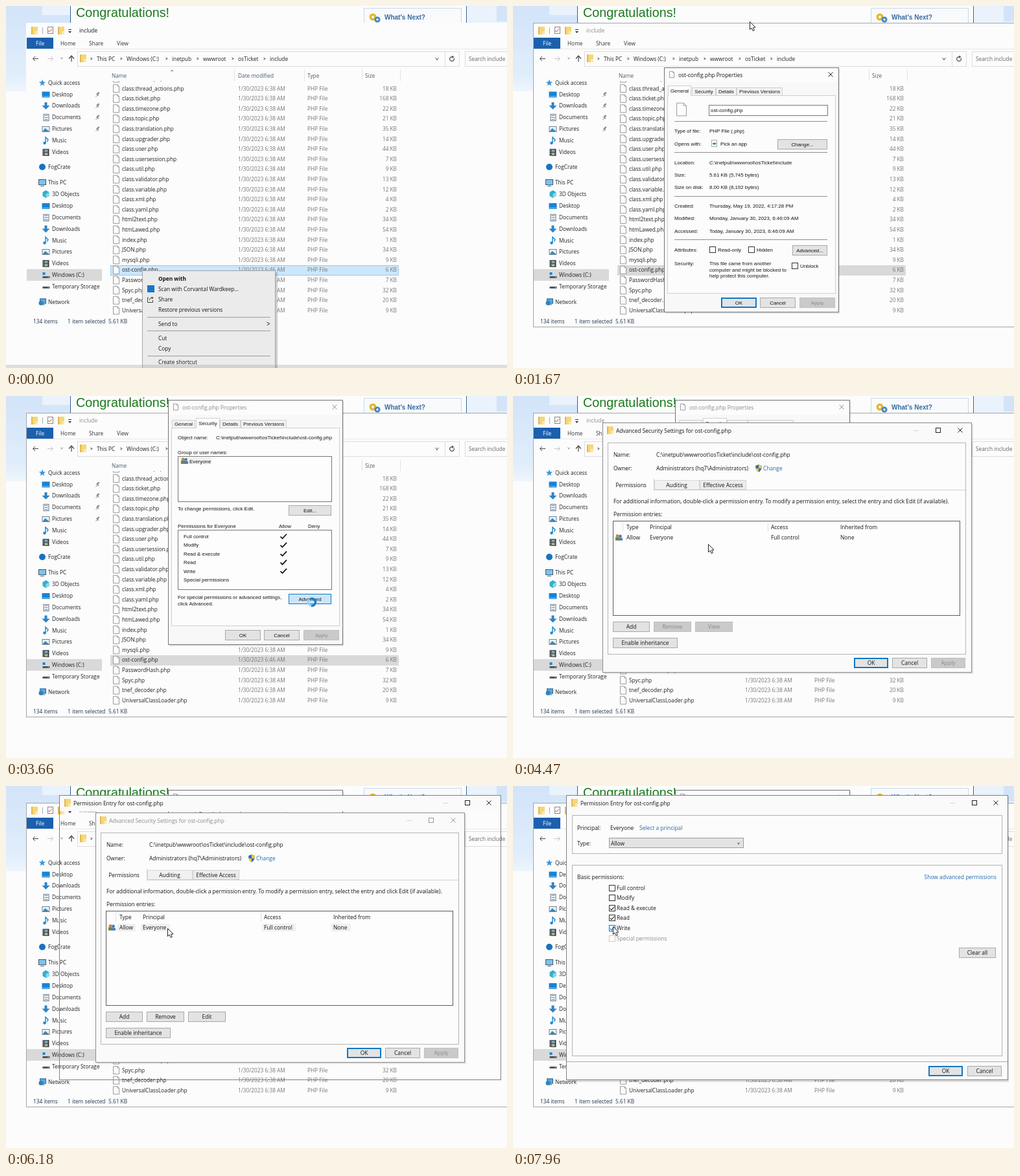
Animation, 773 px wide and 560 px high, one loop 8 s. Source, as an HTML page with a canvas:

```html
<!DOCTYPE html>
<html lang="en">
<head>
<meta charset="utf-8">
<title>File permissions</title>
<style>
html, body { margin: 0; width: 100%; height: 100%; overflow: hidden; background: #fcfcfc; }
canvas { display: block; }
</style>
</head>
<body>
<canvas id="stage" width="773" height="560"></canvas>
<script>
const c = document.getElementById('stage').getContext('2d');
const LOOP = 8000;
const UI = '"Open Sans", "Noto Sans", sans-serif';
const DLG = '"Liberation Sans", Arial, sans-serif';
const INK = '#161616', GREY = '#8b8b8b', PAPER = '#fcfcfc', LINK = '#2468ad', BLUE = '#0f78c8';
const FILE = 'ost-config.php';

// Drawing helpers
function box(x, y, w, h, fill, stroke) {
  if (fill) { c.fillStyle = fill; c.fillRect(x, y, w, h); }
  if (stroke) { c.strokeStyle = stroke; c.lineWidth = 1; c.strokeRect(x + .5, y + .5, w - 1, h - 1); }
}
function line(points, color = '#333', width = 1) {
  c.beginPath();
  points.forEach(([x, y], i) => i ? c.lineTo(x, y) : c.moveTo(x, y));
  c.strokeStyle = color; c.lineWidth = width; c.stroke();
}
function shape(points, fill, stroke) {
  c.beginPath();
  points.forEach(([x, y]) => c.lineTo(x, y));
  c.closePath();
  if (fill) { c.fillStyle = fill; c.fill(); }
  if (stroke) { c.strokeStyle = stroke; c.lineWidth = 1; c.stroke(); }
}
function disc(x, y, r, fill) {
  c.beginPath(); c.arc(x, y, r, 0, 7); c.fillStyle = fill; c.fill();
}
const hline = (x1, x2, y, color) => line([[x1, y + .5], [x2, y + .5]], color);
const vline = (x, y1, y2, color) => line([[x + .5, y1], [x + .5, y2]], color);

// y is the middle of the capitals
function text(s, x, y, color = INK, font = '8.3px ' + UI, align = 'left') {
  c.font = font; c.fillStyle = color; c.textAlign = align;
  c.fillText(s, x, Math.round(y + 3));
}
const ui = (s, x, y, color, align) => text(s, x, y, color, '8.45px ' + UI, align);
const dlg = (s, x, y, color, align) => text(s, x, y, color, '7.9px ' + DLG, align);

function clipTo(x, y, w, h, draw) {
  c.save(); c.beginPath(); c.rect(x, y, w, h); c.clip();
  draw(); c.restore();
}
function button(label, x, y, w, { write = ui, off, main, hot } = {}) {
  box(x, y, w, 16, off ? '#cacaca' : hot ? '#cce4f7' : '#e3e3e3', off ? '#c0c0c0' : main || hot ? BLUE : '#a9a9a9');
  if (main) box(x + 1, y + 1, w - 2, 14, null, BLUE);
  write(label, x + w / 2, y + 8, off ? GREY : INK, 'center');
}
function chevron(x, y, dx, dy, color = '#555') {
  line([[x - dx - dy, y - dy - dx], [x + dx * .8, y + dy * .8], [x - dx + dy, y - dy + dx]], color);
}
function cross(x, y, color) {
  line([[x - 3.5, y - 3.5], [x + 3.5, y + 3.5]], color);
  line([[x + 3.5, y - 3.5], [x - 3.5, y + 3.5]], color);
}
const tick = (x, y, s = 1, color = '#111', w = 1.7) =>
  line([[x - 4.5 * s, y], [x - 1.5 * s, y + 3 * s], [x + 5 * s, y - 4 * s]], color, w);
function checkbox(x, y, on, color = '#333') {
  box(x - 5, y - 5, 10, 10, '#fff', color);
  if (on) tick(x, y + .5, .7, color, 1.2);
}

// Icons
function folder(x, y) {
  box(x - 5, y - 6, 10, 12, '#f5d778');
  box(x - 5, y - 6, 2, 12, '#e3b84c');
  box(x + 1, y + 1, 4, 5, '#fae9ab');
}
function page(x, y, s = 1) {
  const p = (a, b) => [x + a * s, y + b * s];
  shape([p(-4.5, -6), p(2, -6), p(4.5, -3.5), p(4.5, 6), p(-4.5, 6)], '#fdfdfd', '#9a9a9a');
  line([p(2, -6), p(2, -3.5), p(4.5, -3.5)], '#9a9a9a');
}
function people(x, y) {
  disc(x - 2, y - 2, 2.4, '#b58c50'); box(x - 5, y, 6, 5, '#668754');
  disc(x + 2.5, y - 1.5, 2.4, '#557aa0'); box(x, y + 1, 6, 4, '#4f7dad');
}
function shield(x, y) {
  clipTo(x - 5, y - 6, 10, 12, () => {
    c.beginPath(); c.moveTo(x - 5, y - 4); c.lineTo(x, y - 6); c.lineTo(x + 5, y - 4);
    c.quadraticCurveTo(x + 5, y + 3, x, y + 6); c.quadraticCurveTo(x - 5, y + 3, x - 5, y - 4); c.clip();
    box(x - 5, y - 6, 10, 12, '#2d70b8');
    box(x, y - 6, 5, 6, '#f0c53c'); box(x - 5, y, 5, 6, '#f0c53c');
  });
}
const icons = {
  star(x, y) {
    shape(Array.from({ length: 10 }, (_, i) => {
      const r = i % 2 ? 2.3 : 5.5, a = i * Math.PI / 5 - Math.PI / 2;
      return [x + r * Math.cos(a), y + r * Math.sin(a)];
    }), '#3a94d8');
  },
  desktop(x, y) { box(x - 6, y - 4, 12, 9, '#1584d8'); box(x - 6, y + 3, 12, 1, '#8cc8f2'); },
  down(x, y) {
    shape([[x - 2, y - 5], [x + 2, y - 5], [x + 2, y], [x + 6, y], [x, y + 6], [x - 6, y], [x - 2, y]], '#2f83c6');
  },
  doc(x, y) {
    box(x - 4, y - 5, 9, 11, '#f7fafc', '#68798a');
    for (let i = 0; i < 3; i++) hline(x - 2, x + 3, y - 3 + i * 3, '#3d8bc9');
  },
  picture(x, y) {
    box(x - 6, y - 4, 12, 9, '#e3f2fb', '#78848d');
    shape([[x - 5, y + 4], [x - 1, y - 1], [x + 5, y + 4]], '#3a86b8');
  },
  note(x, y) {
    disc(x - 2, y + 4, 2.2, '#1b8bd5');
    line([[x - .5, y + 4], [x - .5, y - 5], [x + 3.5, y - 1], [x + 2, y + 2]], '#1b8bd5', 1.5);
  },
  film(x, y) {
    box(x - 5, y - 5, 10, 11, '#3c4045'); box(x - 2, y - 4, 5, 4, '#79a5c7'); box(x - 2, y + 1, 5, 4, '#a6b18b');
    for (let i = 0; i < 4; i++) box(x - 4, y - 4 + i * 3, 1, 1, '#eee');
  },
  dot(x, y) { disc(x, y, 5, '#1474c4'); },
  pc(x, y) { box(x - 6, y - 5, 12, 9, '#7cc3ec', '#43596b'); box(x - 3, y + 5, 6, 1, '#51646f'); },
  cube(x, y) {
    shape([[x - 5, y - 3], [x, y - 6], [x + 5, y - 3], [x + 5, y + 3], [x, y + 6], [x - 5, y + 3]], '#31b0cd');
    shape([[x, y], [x + 5, y - 3], [x + 5, y + 3], [x, y + 6]], '#87d8e5');
  },
  system(x, y) { box(x - 5, y - 4, 4, 4, '#1c86d0'); icons.drive(x, y + 2); },
  drive(x, y) { box(x - 5, y, 11, 3, '#50565b'); box(x + 3, y + 1, 2, 1, '#8fe08a'); },
  net(x, y) {
    box(x - 4, y - 5, 10, 8, '#5aa9dc', '#376c92'); disc(x - 2, y + 2, 3.5, '#2c83c4'); box(x, y + 4, 4, 1, '#48677b');
  }
};

// Desktop and web page behind
function desktop() {
  box(0, 0, 773, 560, PAPER);
  const sky = c.createLinearGradient(0, 0, 0, 140);
  sky.addColorStop(0, '#d3e4f9'); sky.addColorStop(.75, '#e0edfb'); sky.addColorStop(1, '#f3f8fd');
  box(0, 0, 100, 132, sky);
  box(56, 0, 43, 14, '#eaf3fc');
  box(712, 0, 61, 30, '#eaf2fc'); box(757, 0, 16, 24, '#d3e4f9');
  box(100, 0, 611, 30, PAPER);
  vline(99, 0, 27, '#2f5f98'); vline(710, 0, 27, '#2f5f98');
  text('Congratulations!', 108, 14, '#1b7a1e', '19.8px ' + DLG);
  box(552, 3, 151, 26, '#f8fafc', '#c9d8e8');
  disc(566, 17, 5.5, '#e5b72e'); disc(566, 17, 2, '#f8fafc');
  disc(573, 21, 4.5, '#4385c2'); disc(573, 21, 1.7, '#f8fafc');
  text("What's Next?", 584, 17.5, '#396a9d', 'bold 10px ' + DLG);
}

// File manager
const files = [['class.thread', 14], ['class.thread_actions', 18], ['class.ticket', 168], ['class.timezone', 22],
  ['class.topic', 21], ['class.translation', 35], ['class.upgrader', 14], ['class.user', 44], ['class.usersession', 7],
  ['class.util', 9], ['class.validator', 13], ['class.variable', 12], ['class.xml', 4], ['class.yaml', 2],
  ['html2text', 34], ['htmLawed', 54], ['index', 1], ['JSON', 34], ['mysqli', 9], ['ost-config', 6],
  ['PasswordHash', 7], ['Spyc', 32], ['tnef_decoder', 20], ['UniversalClassLoader', 9]];
const tree = [['Quick access', 119, 'star'], ['Desktop', 136.5, 'desktop', 1], ['Downloads', 154, 'down', 1],
  ['Documents', 172, 'doc', 1], ['Pictures', 190, 'picture', 1], ['Music', 208, 'note', 1], ['Videos', 226, 'film', 1],
  ['FogCrate', 249, 'dot'], ['This PC', 273, 'pc'], ['3D Objects', 291, 'cube', 1], ['Desktop', 309, 'desktop', 1],
  ['Documents', 327, 'doc', 1], ['Downloads', 344.5, 'down', 1], ['Music', 362.5, 'note', 1],
  ['Pictures', 380, 'picture', 1], ['Videos', 398, 'film', 1], ['Windows (C:)', 416, 'system', 1],
  ['Temporary Storage', 434, 'drive', 1], ['Network', 457.5, 'net']];

function explorer(active) {
  box(31, 26, 760, 471, PAPER, active ? null : '#a5a5a5');
  folder(44, 38); folder(85, 38);
  vline(56, 33, 43, '#aaa');
  box(64, 32, 9, 11, '#fff', '#888'); tick(68, 38, .6, '#c03b35', 1);
  hline(96, 101, 36, '#333'); shape([[96, 39], [101, 39], [98.5, 42]], '#333');
  text('include', 113, 38, active ? INK : GREY);
  box(32, 49, 41, 17, '#1b60ae');
  text('File', 52.5, 58, '#fff', undefined, 'center');
  [['Home', 84], ['Share', 128], ['View', 171]].forEach(([s, x]) => text(s, x, 58, '#333'));
  hline(32, 773, 66, '#e9e9e9');

  [[46, '#444', 1], [68, '#c3c3c3', -1]].forEach(([x, col, d]) => {
    line([[x - 4, 81.5], [x + 4, 81.5]], col);
    line([[x - d, 78], [x - 4.5 * d, 81.5], [x - d, 85]], col);
  });
  chevron(86, 81, 0, 1.5, '#999');
  line([[101, 86], [101, 77.5]], '#444', 1.2); line([[97, 81.5], [101, 77], [105, 81.5]], '#444', 1.2);
  box(110, 70, 590, 24, PAPER, '#dcdcdc'); vline(677, 71, 93, '#dcdcdc');
  folder(119, 81);
  [['This PC', 140], ['Windows (C:)', 186], ['inetpub', 256], ['wwwroot', 304], ['osTicket', 358], ['include', 407]]
    .forEach(([s, x]) => { chevron(x - 8, 81.5, 1.5, 0, '#444'); text(s, x, 81.5, '#222'); });
  chevron(665, 82, 0, 2.2);
  c.beginPath(); c.arc(688, 82, 3.3, -.5, 4.8); c.strokeStyle = '#555'; c.lineWidth = 1.2; c.stroke();
  shape([[688, 76.5], [691.5, 78.7], [688, 81]], '#555');
  box(708, 70, 80, 24, PAPER, '#dcdcdc');
  text('Search include', 714, 81.5, '#666');

  chevron(256, 100, 0, -1.5, '#777');
  [['Name', 163], ['Date modified', 358], ['Type', 465], ['Size', 554]].forEach(([s, x]) => text(s, x, 107.5, '#4c5b6e'));
  [352, 460, 549, 608].forEach(x => vline(x, 98, 116, '#e3e3e3'));

  clipTo(161, 116, 450, 365, () => files.forEach(([name, size], i) => {
    const y = 127.6 + 15.6 * (i - 1), chosen = name === 'ost-config';
    if (chosen) box(161, 401, 445, 16, active ? '#cce6fb' : '#d9d9d9', active ? '#9ccbea' : null);
    page(170, y);
    text(name + '.php', 179, y, '#222');
    text(`1/30/2023 6:${chosen ? 46 : 38} AM`, 358, y, '#777');
    text('PHP File', 465, y, '#777');
    text(size + ' KB', 603, y, '#777', undefined, 'right');
  }));

  box(32, 407, 116, 18, '#d9d9d9');
  tree.forEach(([name, y, icon, deep], i) => {
    icons[icon](deep ? 61.5 : 56, y);
    text(name, deep ? 71 : 65, y, '#222');
    if (i > 0 && i < 5) {
      line([[138.5, y + 4], [141, y + 1]], '#888');
      line([[139.5, y - 1], [143, y + 2.5]], '#888', 1.2);
      line([[141, y], [143.5, y - 3]], '#888', 2.5);
    }
  });
  [['134 items', 42], ['1 item selected', 95], ['5.61 KB', 158]].forEach(([s, x]) => text(s, x, 488, '#26364c'));
}

function contextMenu() {
  box(0, 555, 773, 5, '#dedede');
  box(213, 412, 206, 160, 'rgba(0,0,0,.18)');
  box(210, 409, 206, 170, '#ebebeb', '#a3a3a3');
  text('Open with', 235, 421.5, INK, 'bold 8.3px ' + UI);
  [['Scan with Corvantal Wardkeep...', 437.5], ['Share', 454], ['Restore previous versions', 470], ['Send to', 491.5],
    ['Cut', 513.5], ['Copy', 530], ['Create shortcut', 551]].forEach(([s, y]) => text(s, 235, y));
  [481, 502, 541].forEach(y => hline(218, 408, y, '#9b9b9b'));
  box(218, 432, 11, 11, '#1976c9');
  line([[220, 451], [218.5, 451], [218.5, 458.5], [226.5, 458.5], [226.5, 455]], '#444');
  line([[221, 455], [223, 451.5], [227, 451.5]], '#444'); chevron(226, 451.5, 1.5, 0, '#444');
  chevron(405, 491.5, 2.4, 0, '#333');
  box(211, 555, 204, 5, '#d2d2d2');
}

// Properties dialog
function generalPage() {
  page(260, 160, 1.65);
  box(302, 153, 184, 17, '#fff', '#777');
  dlg(FILE, 305, 160.5);
  [178, 226, 294, 361].forEach(y => hline(249, 485, y, '#8e8e8e'));
  [['Type of file:', 'PHP File (.php)', 193], ['Opens with:', '', 212.5],
    ['Location:', 'C:\\inetpub\\wwwroot\\osTicket\\include', 241.5], ['Size:', '5.61 KB (5,745 bytes)', 261],
    ['Size on disk:', '8.00 KB (8,192 bytes)', 280], ['Created:', 'Thursday, May 19, 2022, 4:17:28 PM', 309],
    ['Modified:', 'Monday, January 30, 2023, 6:46:09 AM', 328], ['Accessed:', 'Today, January 30, 2023, 6:46:09 AM', 347.5],
    ['Attributes:', '', 377], ['Security:', 'This file came from another', 398],
    ['', 'computer and might be blocked to', 407.5], ['', 'help protect this computer.', 417]]
    .forEach(([a, b, y]) => { dlg(a, 249, y); dlg(b, 303, y); });
  box(306, 207, 9, 11, '#fff', '#aaa'); line([[308, 213], [313, 213]], '#299a50', 2); chevron(312, 213, 1.7, 0, '#299a50');
  dlg('Pick an app', 320, 212.5);
  button('Change...', 408, 206, 77, { write: dlg });
  [[308, 377, 'Read-only'], [368, 377, 'Hidden'], [435, 401.5, 'Unblock']].forEach(([x, y, s]) => {
    checkbox(x, Math.round(y), false); dlg(s, x + 8, y);
  });
  button('Advanced...', 431, 370, 54, { write: dlg });
}

function securityPage(partial, hot) {
  if (partial) box(262, 195, 93, 11, '#f0f0f0');
  dlg('Permissions for Everyone', 265, 200.5);
  if (!partial) {
    clipTo(255, 55, 248, 20, () => {
      dlg('Object name:', 265, 63.5);
      dlg('C:\\inetpub\\wwwroot\\osTicket\\include\\' + FILE, 324, 63.5);
    });
    dlg('Group or user names:', 265, 86.5);
    box(265, 93, 238, 71, '#fdfdfd', '#777');
    box(269, 95, 48, 11, '#f1f1f1'); people(275, 100); dlg('Everyone', 283, 100.5);
    dlg('To change permissions, click Edit.', 265, 174);
    button('Edit...', 436, 169, 66, { write: dlg });
    dlg('Allow', 421, 200.5); dlg('Deny', 466, 200.5);
    box(265, 207, 238, 93, '#fdfdfd', '#777');
    ['Full control', 'Modify', 'Read & execute', 'Read', 'Write', 'Special permissions']
      .forEach((s, i) => dlg(s, 274, 217 + i * 13.4));
    dlg('For special permissions or advanced settings,', 265, 311); dlg('click Advanced.', 265, 320.5);
    button('Advanced', 436, 306, 66, { write: dlg, hot });
  }
  for (let i = 0; i < 5; i++) tick(428, 217.5 + i * 13.4);
}

function properties(t) {
  const moved = t >= 1850, secure = t >= 2210, active = t < 3570;
  c.save();
  if (moved) c.translate(17, -89);
  box(235, 97, 269, 379, 'rgba(0,0,0,.10)');
  box(233, 95, 270, 379, '#f8f8f8', '#737373');
  box(234, 96, 268, 22, PAPER);
  page(245, 106, .8);
  ui(FILE + ' Properties', 255, 106.5, active ? INK : GREY);
  cross(490, 106, active ? '#222' : '#999');
  box(238, 138, 260, 307, PAPER, '#d0d0d0');
  [['General', 239, 36], ['Security', 276, 37], ['Details', 313, 32], ['Previous Versions', 345, 71]].forEach(([s, x, w], i) => {
    const on = i === +secure;
    box(x, on ? 123 : 126, w, on ? 16 : 13, on ? PAPER : '#f2f2f2', '#d0d0d0');
    if (on) box(x + 1, 137, w - 2, 3, PAPER);
    dlg(s, x + w / 2, on ? 131 : 132, INK, 'center');
  });
  button('OK', 321, 451, 55, { write: dlg, main: active });
  button('Cancel', 381, 451, 55, { write: dlg });
  button('Apply', 442, 451, 55, { write: dlg, off: true });
  if (!secure) generalPage();
  c.restore();
  if (secure) securityPage(t < 2350, t >= 3200);
}

function windowButtons(min, max, close, y, color) {
  hline(min - 4, min + 4, y, '#d5d5d5');
  box(max - 4, y - 4, 8, 8, null, color);
  cross(close, y, color);
}

// Advanced security window
function advanced(t) {
  const active = t < 6060, chosen = t >= 5290;
  box(140, 43, 570, 387, 'rgba(0,0,0,.10)');
  box(138, 41, 570, 387, '#fafafa', '#8a8a8a');
  folder(150, 53);
  ui('Advanced Security Settings for ' + FILE, 159, 53.5, active ? INK : GREY);
  windowButtons(622, 656, 690, 53, active ? '#222' : '#999');
  box(146, 72, 553, 328, PAPER, '#b5b5b5');
  ui('Name:', 155, 91); ui('C:\\inetpub\\wwwroot\\osTicket\\include\\' + FILE, 221, 91);
  ui('Owner:', 155, 112); ui('Administrators (hq7\\Administrators)', 221, 112);
  shield(379, 112); ui('Change', 386, 112, LINK);
  hline(217, 698, 145, '#d0d0d0');
  box(147, 128, 70, 18, PAPER); vline(217, 128, 145, '#d0d0d0');
  box(218, 130, 70, 15, '#f1f1f1', '#d8d8d8'); box(288, 130, 72, 15, '#ececec', '#d0d0d0');
  ui('Permissions', 182, 137.5, INK, 'center');
  ui('Auditing', 252.5, 137.5, INK, 'center');
  ui('Effective Access', 324, 137.5, INK, 'center');
  ui('For additional information, double-click a permission entry. To modify a permission entry, select the entry and click Edit (if available).', 155, 163);
  ui('Permission entries:', 155, 183);
  box(154, 193, 536, 147, '#fdfdfd', '#5c5c5c');
  [169, 393].forEach(x => vline(x, 195, 210, '#dedede'));
  if (chosen && active) box(170, 212, 518, 13, '#0078d7');
  people(163, 218.5);
  [['Type', 'Allow', 175, 23], ['Principal', 'Everyone', 211, 40], ['Access', 'Full control', 398, 47], ['Inherited from', 'None', 505, 25]]
    .forEach(([head, cell, x, w]) => {
      if (chosen && !active) box(x - 3, 213, w + 5, 12, '#f0f0f0');
      ui(head, x, 202.5);
      ui(cell, x, 219, chosen && active ? '#fff' : INK);
    });
  button('Add', 154, 349, 57);
  button('Remove', 217, 349, 58, { off: !chosen });
  button(chosen ? 'Edit' : 'View', 281, 349, 58, { off: !chosen });
  button('Enable inheritance', 154, 374, 100);
  button('OK', 526, 405, 53, { main: true });
  button('Cancel', 585, 405, 54);
  button('Apply', 645, 405, 53, { off: true });
}

// Permission entry window
function entry(t) {
  const ready = t >= 6230;
  if (ready) box(84, 16, 681, 442, 'rgba(0,0,0,.12)');
  box(82, 14, 682, ready ? 441 : 25, '#fafafa');
  box(82, 14, 682, 441, null, '#7f7f7f');
  folder(95, 26);
  ui('Permission Entry for ' + FILE, 104, 26.5);
  windowButtons(678, 712, 745, 26, '#222');
  if (!ready) return;
  box(91, 45, 664, 60, PAPER, '#b3b3b3');
  ui('Principal:', 99, 64.5); ui('Everyone', 150, 64.5); ui('Select a principal', 195, 64.5, LINK);
  ui('Type:', 99, 89);
  box(148, 80, 208, 16, '#e3e3e3', '#9c9c9c'); ui('Allow', 151, 88.5); chevron(348, 89, 0, 1.6);
  box(91, 122, 664, 296, PAPER, '#b3b3b3');
  ui('Basic permissions:', 99, 140.5);
  ui('Show advanced permissions', 746, 140.5, LINK, 'right');
  ['Full control', 'Modify', 'Read & execute', 'Read', 'Write', 'Special permissions'].forEach((s, i) => {
    const y = 157.5 + i * 15.6, last = i === 5;
    const on = [t < 7250, t < 7660, true, true, true, false][i];
    const hover = [t > 7000 && t < 7400, t >= 7400 && t < 7760, 0, 0, t >= 7890, 0][i];
    checkbox(153, Math.round(y), on, last ? '#c8c8c8' : hover ? BLUE : '#333');
    ui(s, 160, y, last ? GREY : INK);
  });
  button('Clear all', 688, 250, 57);
  hline(83, 763, 426, '#aaa');
  button('OK', 641, 433, 53, { main: true });
  button('Cancel', 701, 433, 53);
}

// Pointer: time and tip position
const path = [[1010, 262, 575], [1380, 348, 113], [1460, 348, 113], [1660, 365, 24], [1860, 365, 24], [2190, 309, 43],
  [2700, 309, 43], [3230, 470, 312], [4000, 470, 312], [4430, 301, 229], [4520, 301, 229], [5120, 249, 220],
  [6420, 249, 220], [7050, 154, 154], [7270, 154, 154], [7470, 154, 170], [7690, 154, 170], [7930, 154, 217], [8000, 154, 217]];

function pointer(t) {
  const next = path.findIndex(p => p[0] > t);
  if (next < 1) return;
  const [t0, x0, y0] = path[next - 1], [t1, x1, y1] = path[next];
  let k = (t - t0) / (t1 - t0);
  k = k * k * (3 - 2 * k);
  const x = Math.round(x0 + (x1 - x0) * k), y = Math.round(y0 + (y1 - y0) * k);
  if (t >= 3600 && t < 4000) {
    const turn = t / 160;
    [['#9cd2f4', 0, 7], ['#187fc9', turn, turn + 4]].forEach(([color, a, b]) => {
      c.beginPath(); c.arc(472, 319, 5.5, a, b); c.strokeStyle = color; c.lineWidth = 3.4; c.stroke();
    });
    return;
  }
  shape([[0, 0], [0, 12], [2.7, 9.6], [4.7, 14], [6.8, 13], [5, 8.8], [8.5, 8.5]]
    .map(([a, b]) => [x + a + .5, y + b + .5]), '#fff', '#222');
}

function draw(t) {
  const menuOpen = t < 380;
  desktop();
  explorer(menuOpen);
  if (menuOpen) contextMenu();
  if (t >= 470) properties(t);
  if (t >= 3920) advanced(t);
  if (t >= 6130) entry(t);
  pointer(t);
}

const start = performance.now();
function tickFrame() {
  draw((performance.now() - start) % LOOP);
  requestAnimationFrame(tickFrame);
}
tickFrame();
</script>
</body>
</html>
```
